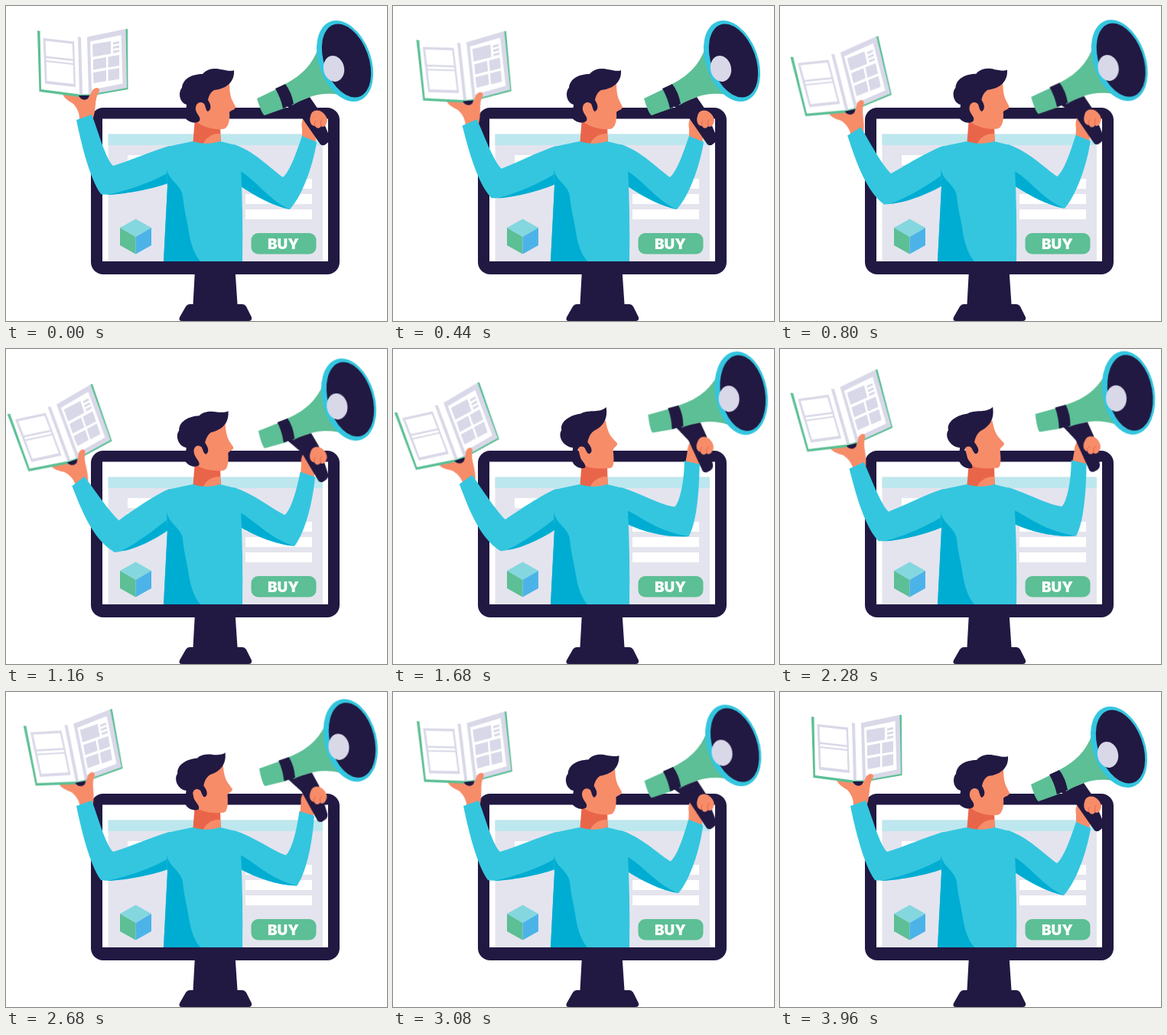
Recreate the animation shown at these times as an HTML page. Size 498 by 412 pixels, loop 4000 ms.

```html
<!DOCTYPE html>
<html lang="en">
<head>
<meta charset="utf-8">
<title>Shop announcement</title>
<style>
  html, body { margin: 0; width: 100%; height: 100%; overflow: hidden; background: #fff; }
  svg { display: block; width: 100%; height: 100%; }

  .ink { fill: #211942; }
  .green { fill: #5cbf95; }
  .sleeve { fill: #34c6df; }
  .shade { fill: #00add2; }
  .skin { fill: #f78c69; }
  .blush { fill: #e9654a; }
  .lilac { fill: #d8d8e8; }
  .white { fill: #fff; }
  .buy { font: 900 19px Inter, "Open Sans", sans-serif; fill: #fff; text-anchor: middle; }

  .move { animation: 4s cubic-bezier(.37, 0, .63, 1) infinite; }

  /* Left arm, then the slower book */
  .l-arm { animation-name: l-arm; }
  .l-shade { animation-name: l-shade; }
  .l-lift { animation-name: l-lift; }
  .l-tilt { animation-name: l-tilt; transform-origin: 103px 145px; }
  @keyframes l-arm {
    0%, 68%, to { d: path("M92 149C98 178 109 225 124 246C135 249 190 240 211 232L245 200L213 183C190 190 160 203 140 209C130 200 120 162 112 142Z"); }
    34% { d: path("M86 181C97 207 112 250 143 267C160 266 195 250 212 237L245 200L213 183C195 191 165 212 148 225C135 213 113 182 102 168Z"); }
  }
  @keyframes l-shade {
    0%, 68%, to { d: path("M131 247C160 242 195 228 210 219L211 232C190 240 150 247 131 247Z"); }
    34% { d: path("M152 265C170 256 195 236 210 224L212 237C195 250 165 265 152 265Z"); }
  }
  @keyframes l-lift {
    0%, 68%, to { transform: none; }
    34% { transform: translate(-7px, 29px); }
  }
  @keyframes l-tilt {
    0%, to { transform: rotate(0deg); }
    34% { transform: rotate(-19.5deg); }
  }

  /* Right arm, megaphone and head */
  .r-arm { animation-name: r-arm; }
  .r-shade { animation-name: r-shade; }
  .r-hand { animation-name: r-hand; transform-origin: 405px 148px; }
  .face { animation-name: face; }
  .hair { animation-name: hair; }
  @keyframes r-arm {
    0%, 15%, 85%, to { d: path("M298 181C325 190 345 212 362 224C372 215 380 190 387 170L406 178C403 200 390 245 371 266C350 262 325 248 307 236L270 205Z"); }
    50% { d: path("M298 181C325 189 350 203 369 204C376 198 381 167 380 143L400 147C400 177 399 222 389 242C361 245 331 239 306 228L270 205Z"); }
  }
  @keyframes r-shade {
    0%, 15%, 85%, to { d: path("M306 216C325 226 345 255 371 266C350 262 325 248 307 236Z"); }
    50% { d: path("M305 210C322 217 348 238 389 242C361 245 331 239 306 228Z"); }
  }
  @keyframes r-hand {
    0%, 15%, 85%, to { transform: translate(0, 0) rotate(0deg); }
    50% { transform: translate(-.5px, -25px) rotate(11.4deg); }
  }
  @keyframes face {
    0%, 15%, 85%, to { d: path("M246 120L268 104L292 98C292 110 293 118 296 124L300 132C300 136 294 136 292 139C293 148 291 161 283 161C270 162 256 158 247 150Z"); }
    50% { d: path("M239 122L255 104L276 93C278 103 280 109 285 115L292 122C293 126 288 127 287 131C288 139 290 155 284 155C270 156 255 157 247 150Z"); }
  }
  @keyframes hair {
    0%, 15%, 85%, to { d: path("M298 84C299 98 290 108 272 110C267 113 265 118 264 123C268 129 269 135 264 138C261 137 261 131 259 128C253 123 247 128 248 136C250 143 255 145 253 150C248 155 238 152 234 146C233 140 236 134 236 129C226 126 225 112 230 107C231 95 243 89 257 89C263 81 275 81 281 83C288 84 294 86 298 84Z"); }
    50% { d: path("M276 75C278 87 276 99 261 107C256 111 254 117 253 122C258 128 261 134 256 137C252 137 251 131 249 129C243 125 238 131 242 138C244 146 253 151 251 156C245 158 236 154 234 146C232 140 235 134 235 129C223 129 213 115 219 106C216 95 230 86 244 84C247 82 256 81 260 81C265 81 273 79 276 75Z"); }
  }
</style>
</head>
<body>
<svg viewBox="0 0 498 412">
  <!-- Monitor -->
  <g class="ink">
    <path d="M247 345H299.500L302.500 390H309Q312 390 314 393L321 407Q322 412 317 412H230Q225 412 227 407L235 393Q237 390 240 390H244.500Z"/>
    <rect x="111" y="133" width="325" height="218" rx="16"/>
  </g>
  <rect class="white" x="126" y="147.500" width="295" height="186.500"/>
  <rect x="133.500" y="167.500" width="280.500" height="166.500" fill="#e4e4ee"/>
  <rect x="133.500" y="167.500" width="280.500" height="14.500" fill="#bde7ee"/>
  <g class="white">
    <rect x="159" y="195" width="60" height="13"/>
    <rect x="159" y="214" width="60" height="12"/>
    <rect x="313" y="226" width="87" height="13"/>
    <rect x="313" y="246" width="87" height="13"/>
    <rect x="313" y="266" width="87" height="13"/>
  </g>
  <rect class="green" x="320.500" y="297" width="85" height="27.500" rx="9"/>
  <text class="buy" x="362.500" y="317.500">BUY</text>
  <path d="M169.500 278.500L190 290L169.500 302L149 290Z" fill="#84d7df"/>
  <path class="green" d="M149 290L169.500 302V324.500L149 313Z"/>
  <path d="M190 290L169.500 302V324.500L190 313Z" fill="#4cb3e9"/>

  <!-- Hand with book -->
  <g class="move l-lift"><g class="move l-tilt">
    <path class="skin" d="M96 154C97 139 93 134 88 128C82 124 76 121 74 115L97 117L108 120C111 115 112 109 118 107C122 107 123 110 121 113C115 122 119 136 112 152Z"/>
    <path class="green" d="M41 32L44.500 33L95 115H108L156 30L159 30L159.500 109L108 118L96 119L43.500 112Z"/>
    <path class="ink" d="M95 117H109C108 124 98 125 95 117Z"/>
    <path class="white" d="M44.500 34L95 40.500H107V115.500H96L46 109Z"/>
    <g class="lilac">
      <path d="M94 40L98 41L100 115.500H96Z"/>
      <path d="M106 40.500L156.500 30L158 107L108 116Z"/>
      <path d="M48.500 42L89 46.500L91 106L51 101.500Z"/>
    </g>
    <path class="white" d="M110 46.500L150.500 38L152.500 101.500L112 109.500Z"/>
    <g class="lilac">
      <path d="M113 50L137 46V62.500L113.500 66.500Z"/>
      <path d="M140 47.500L148 46V49L140 50.500ZM140 53L148 51.500V54.500L140 56ZM140 58.500L148 57V60L140 61.500Z"/>
      <path d="M114 70L131 67V80.500L114 83.500ZM133.500 66.500L148 64V78L133.500 80.500Z"/>
      <path d="M114 87L131 84V98L114.500 101ZM133.500 83.500L148 81V95.500L133.500 98Z"/>
    </g>
    <path class="white" d="M51.500 45.500L86.500 49.500L87.500 69.500L52.500 65.500ZM52.500 68L87.500 72L88.500 102L53.500 98Z"/>
    <path class="lilac" d="M52 71L88 75V77L52 73Z"/>
    <path class="skin" d="M106 124C111 117 111 109 118 107C122 107 123 110 121 113C116 122 117 128 115 136Z"/>
  </g></g>

  <!-- Right palm and wrist, under the cuff -->
  <path class="move r-hand skin" d="M387 182L387 160C385 152 389 143 395 141L401 150L406 160L404 184Z"/>

  <!-- Body -->
  <path class="blush" d="M247 146L280 154L281 184H244Z"/>
  <path class="skin" d="M257 182C260 173 269 166 280 167V182Z"/>
  <path class="move l-arm sleeve"/>
  <path class="move l-shade shade"/>
  <path class="move r-arm sleeve"/>
  <path class="move r-shade shade"/>
  <path class="sleeve" d="M244 177Q262 183 280 177L300 182L307 212Q310 270 309 334H206L211 236L209 190L213 183.500Z"/>
  <path class="shade" d="M210 213C213 229 229 234 231 248C233 270 237 279 239 296C242 314 247 326 254 334H206L211 236Z"/>

  <!-- Head -->
  <path class="move face skin"/>
  <path class="move hair ink"/>

  <!-- Megaphone -->
  <g class="move r-hand">
    <path class="ink" d="M367 131L397 119L408 135L423 171Q424 177 419 180Q415 184 411 181L386 145Z"/>
    <path class="green" d="M328 121L355 108L366 133L338 143Q334 141 328 121Z"/>
    <path class="green" d="M408 55C400 78 385 92 363 103L374 130C395 118 412 112 436 116Z"/>
    <path class="ink" d="M352 108L365 102Q373 112 376 128L362 134Q359 120 352 108Z"/>
    <ellipse class="sleeve" cx="443" cy="72" rx="34" ry="55" transform="rotate(-20 443 72)"/>
    <ellipse class="ink" cx="445" cy="71.500" rx="29" ry="50" transform="rotate(-20 445 71.500)"/>
    <ellipse class="lilac" cx="428.500" cy="82" rx="13.500" ry="17" transform="rotate(-12 428.500 82)"/>
    <path class="skin" d="M398 144C399 138 404 135 410 137C417 140 422 148 419 153C418 158 413 159 412 157C410 161 405 160 404 157C398 157 396 150 398 144Z"/>
    <path d="M404 157Q402 153 405 150M412 157Q410 152 413 148" fill="none" stroke="#e9654a" stroke-width="1"/>
  </g>
</svg>
</body>
</html>
```
